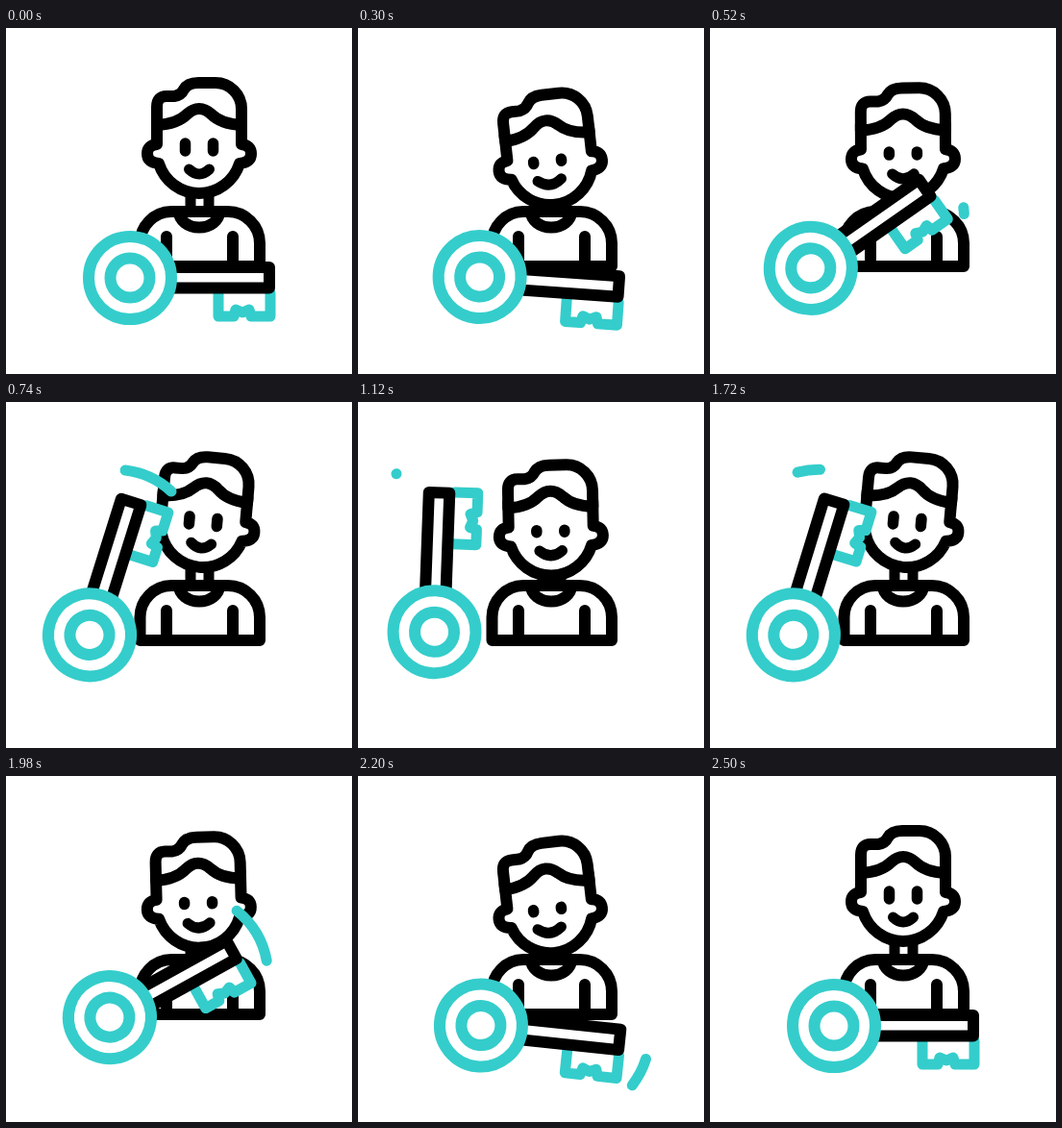
Animation, 360 px wide and 360 px high, one loop 3.6 s. Source, as an HTML page with a canvas:

```html
<!DOCTYPE html>
<html lang="en">
<head>
<meta charset="utf-8">
<title>Person with a key</title>
<style>
html, body { margin: 0; height: 100%; overflow: hidden; background: #fff; }
canvas { display: block; }
</style>
</head>
<body>
<canvas id="stage" width="360" height="360"></canvas>
<script>
const ctx = document.getElementById('stage').getContext('2d');
const TEAL = '#34cdcb', INK = '#000', LOOP = 3600, MIDDLE = 1233, RAD = Math.PI / 180;

// Smooth curve through [time, value] pairs, flat at the extremes
function curve(...keys) {
  const rate = i => (keys[i + 1][1] - keys[i][1]) / (keys[i + 1][0] - keys[i][0]);
  const slopes = keys.map((_, i) => {
    if (i === 0 || i === keys.length - 1) return 0;
    const a = rate(i - 1), b = rate(i);
    return a * b <= 0 ? 0 : 2 * a * b / (a + b);
  });
  return x => {
    if (x <= keys[0][0]) return keys[0][1];
    const i = keys.findIndex(k => k[0] > x) - 1;
    if (i < 0) return keys[keys.length - 1][1];
    const [x0, y0] = keys[i], [x1, y1] = keys[i + 1];
    const d = x1 - x0, u = (x - x0) / d, v = 1 - u;
    return v * v * ((1 + 2 * u) * y0 + u * d * slopes[i]) +
           u * u * ((1 + 2 * v) * y1 - v * d * slopes[i + 1]);
  };
}

// The way back mirrors the way up, so these run to the middle only
const turn = curve([0, 0], [260, 6], [485, -28.8], [740, -72.6], [MIDDLE, -89]);
const shift = curve([0, 0], [260, .02], [485, .42], [740, .84], [MIDDLE, 1]);
const tilt = curve([0, 0], [270, -6.5], [740, 5], [MIDDLE, -2]);
const sink = curve([0, 0], [270, 12], [740, 0], [MIDDLE, 10]);

const body = new Path2D('M139.5 248V224A33 33 0 0 1 172 191H231A33 33 0 0 1 264 224V248ZM167 217V246M236 217V246');
const neck = new Path2D('M192 165V190M211 165V190');
const collar = new Path2D('M180 191A21 16.5 0 0 0 222 191Z');
const face = new Path2D('M157 95V121Q147 122 147 131Q147 140 159 141A44 44 0 0 0 243 141Q255 140 255 131Q255 122 245 121V95');
const hair = new Path2D('M157 101V82Q157 71 167 71H175Q182 70 185 64Q189 57 200 57H218A27 27 0 0 1 245 84V101Q224 100 214 90Q201 78 188 90Q178 100 157 101Z');
const teeth = new Path2D('M146 16V40H126L124 33L117 36L110 33L108 40H92V16');
const shaft = new Path2D('M40 -11H145V10.5H40Z');
const arc = (x, r, a = 0, b = 360) => {
  const path = new Path2D();
  path.arc(x, 0, r, a * RAD, b * RAD);
  return path;
};
const ring = arc(0, 43), hole = arc(0, 20.5);

function draw(path, color, width = 12, fill = true) {
  ctx.lineWidth = width;
  ctx.strokeStyle = color;
  ctx.fillStyle = '#fff';
  if (fill) ctx.fill(path);
  ctx.stroke(path);
}

function place(x, y, deg, paint) {
  ctx.save();
  ctx.translate(x, y);
  ctx.rotate(deg * RAD);
  paint();
  ctx.restore();
}

function drawHead(s) {
  const lean = tilt(s), dy = sink(s), sway = Math.max(0, -lean) * .6;
  place(201 + sway, 172 + dy, lean, () => {
    ctx.translate(-201, -172);
    draw(face, INK);
    draw(hair, INK);
    // Eyes squint and the smile widens as the head goes down
    const half = Math.max(1, 4 - .45 * dy), w = 10.5 + .15 * dy;
    const y = 124 + .2 * dy, m = 147 - .1 * dy, x = 201 - .7 * sway;
    const eyes = new Path2D(`M${x - 14.5} ${y - half}v${2 * half}M${x + 14.5} ${y - half}v${2 * half}`);
    draw(eyes, INK, 11.5, false);
    draw(new Path2D(`M${x - w} ${m}Q${x} ${m + 10} ${x + w} ${m}`), INK, 11, false);
  });
}

function drawKey() {
  draw(teeth, TEAL, 11);
  draw(shaft, INK);
  draw(ring, TEAL);
  draw(hole, TEAL);
}

// Stroke ahead of the key's tip: its front leaves first, its back catches up
function drawSwoosh(t) {
  const up = t < MIDDLE;
  const ease = (from, to) => {
    const u = Math.min(1, Math.max(0, (t - from) / (to - from)));
    return u * u * (3 - 2 * u);
  };
  const front = up ? ease(440, 930) : ease(1500, 2180);
  const back = up ? ease(640, 1130) : ease(1840, 2420);
  if (front === 0 || back === 1) return;
  const angle = p => (up ? 1 - 2 * p : 2 * p - 1) * 32;
  const ends = [angle(front), angle(back)];
  draw(arc(90, 86, Math.min(...ends), Math.max(...ends) + .01), TEAL, 11, false);
}

function frame(now) {
  const t = Math.floor(now % LOOP / 20) * 20;
  const s = MIDDLE - Math.abs(t - MIDDLE);
  ctx.fillStyle = '#fff';
  ctx.fillRect(0, 0, 360, 360);
  ctx.lineCap = ctx.lineJoin = 'round';
  draw(body, INK);
  draw(collar, INK);
  draw(neck, INK, 11, false);
  drawHead(s);
  place(129 - 50 * shift(s), 260 - 21 * shift(s), turn(s), () => {
    drawKey();
    drawSwoosh(t);
  });
}

const start = performance.now();
function tick() {
  frame(performance.now() - start);
  requestAnimationFrame(tick);
}
tick();
</script>
</body>
</html>
```
